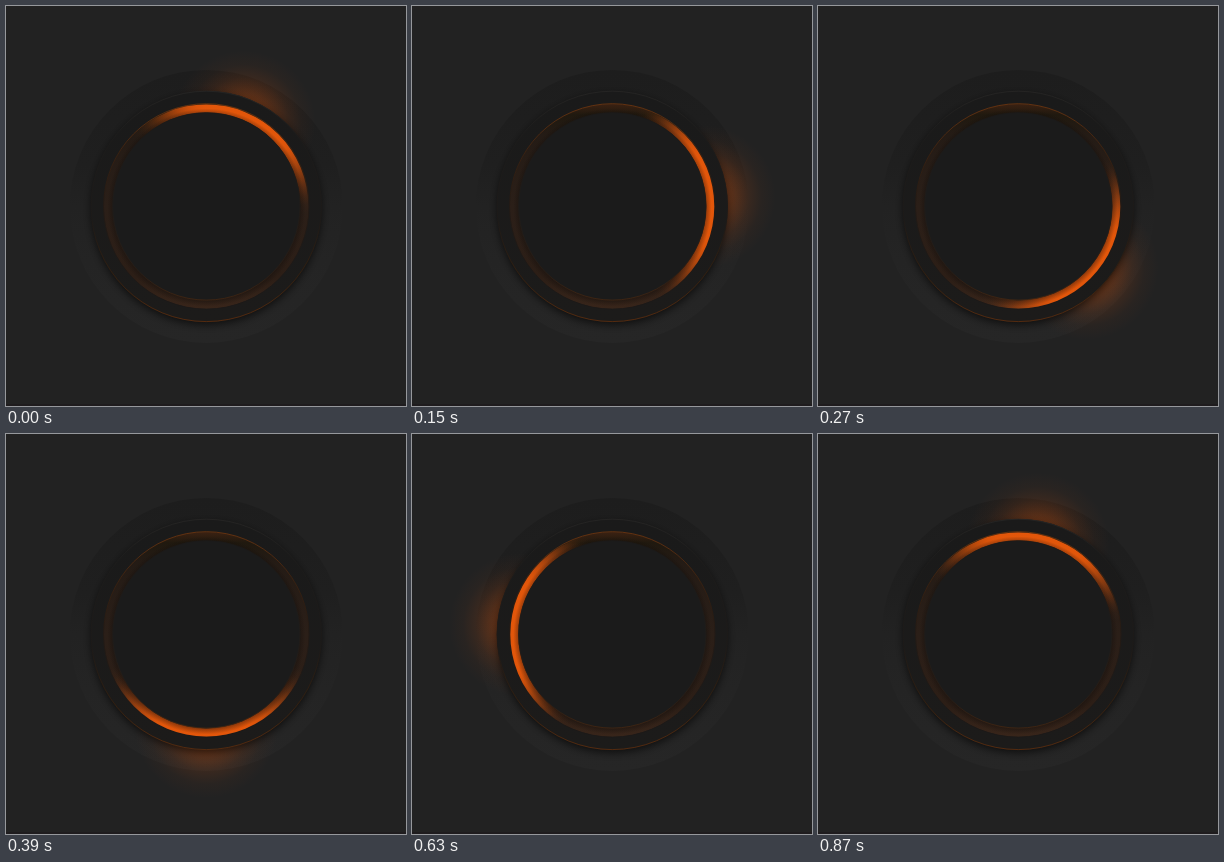
These frames come from a looping animation (400x400 px, 900 ms). An HTML page with a canvas:

```html
<!DOCTYPE html>
<html lang="en">
<head>
<meta charset="utf-8">
<title>Orbiting ember dial</title>
<style>
html, body { margin: 0; width: 100%; height: 100%; overflow: hidden; background: #222; }
canvas { display: block; width: 400px; height: 400px; }
</style>
</head>
<body>
<canvas id="dial" width="400" height="400"></canvas>
<script>
const ctx = document.getElementById('dial').getContext('2d');
const LOOP = 900, STEP = 30, START = 24;
const TAU = Math.PI * 2;
const ember = a => `rgba(232,88,10,${a})`;

function stops(grad, list) {
  for (const [at, color] of list) grad.addColorStop(at, color);
  return grad;
}

function vertical(y0, y1, list) {
  return stops(ctx.createLinearGradient(0, y0, 0, y1), list);
}

function disc(r, fill, y = 0) {
  ctx.beginPath();
  ctx.arc(0, y, r, 0, TAU);
  ctx.fillStyle = fill;
  ctx.fill();
}

function line(r, stroke, width = 1) {
  ctx.beginPath();
  ctx.arc(0, 0, r, 0, TAU);
  ctx.strokeStyle = stroke;
  ctx.lineWidth = width;
  ctx.stroke();
}

function band(outer, inner, fill) {
  ctx.beginPath();
  ctx.arc(0, 0, outer, 0, TAU);
  ctx.arc(0, 0, inner, 0, TAU, true);
  ctx.fillStyle = fill;
  ctx.fill();
}

// Soft light behind the ring, centred on its own radius
function glow(angle) {
  ctx.save();
  ctx.rotate(angle);
  ctx.translate(0, -92);
  disc(72, stops(ctx.createRadialGradient(0, 0, 0, 0, 0, 72), [
    [0, ember(.5)], [.33, ember(.34)], [.48, ember(.22)],
    [.63, ember(.11)], [.8, ember(.035)], [1, ember(0)]
  ]));
  ctx.restore();
}

// Light in the groove, fading along both ends
function arc(angle) {
  const grad = ctx.createConicGradient(angle - Math.PI, 0, 0);
  for (let d = -70; d <= 70; d += 5) {
    const k = Math.min(1, (70 - Math.abs(d)) / 46);
    grad.addColorStop((d + 90) / 360, ember((k * k * (3 - 2 * k) * .97).toFixed(3)));
  }
  band(102, 93.5, grad);
}

function draw(angle) {
  ctx.setTransform(1, 0, 0, 1, 0, 0);
  ctx.fillStyle = '#222';
  ctx.fillRect(0, 0, 400, 400);
  ctx.fillStyle = '#1f1c1e';
  ctx.fillRect(0, 398, 400, 2);
  ctx.translate(200.3, 200.4);

  disc(136.5, vertical(-136, 136, [[0, '#1d1d1d'], [.35, '#1f1f1f'], [.5, '#222'], [.7, '#242424'], [1, '#262626']]));
  glow(angle);

  ctx.save();
  ctx.shadowColor = 'rgba(0,0,0,.65)';
  ctx.shadowBlur = 9;
  ctx.shadowOffsetY = 3;
  disc(115, '#1a1a1a');
  ctx.restore();
  disc(115.5, vertical(-115, 115, [[0, '#1a1a1a'], [1, '#1c1b1a']]));
  line(115.2, vertical(-115, 115, [[0, '#262524'], [.2, '#1d1c1b'], [.55, '#1d1a18'], [.8, '#35200f'], [1, '#5a2c0e']]), .9);

  band(102.5, 93, vertical(-102, 102, [[0, '#3a2112'], [.05, '#20190f'], [.15, '#241b15'], [.5, '#2b1f18'], [.85, '#2c1e16'], [1, '#38251a']]));
  line(102.7, vertical(-102, 102, [[0, '#6a340f'], [.25, '#3a2110'], [.5, '#241a14'], [1, '#1b1817']]), .9);
  arc(angle);

  // Shade cast by the knob onto the groove
  band(102, 93, stops(ctx.createRadialGradient(0, 1, 93, 0, 1, 99), [
    [0, 'rgba(16,12,10,.42)'], [1, 'rgba(16,12,10,0)']
  ]));
  disc(94, '#1b1b1b');
  line(93.7, vertical(-94, 94, [[0, '#1b1918'], [.5, '#211c18'], [.85, '#2b1e15'], [1, '#462711']]), .8);
}

function tick(now) {
  const frame = Math.floor((now % LOOP) / STEP);
  draw((START + frame * STEP * 360 / LOOP) * Math.PI / 180);
  requestAnimationFrame(tick);
}

draw(START * Math.PI / 180);
requestAnimationFrame(tick);
</script>
</body>
</html>
```
